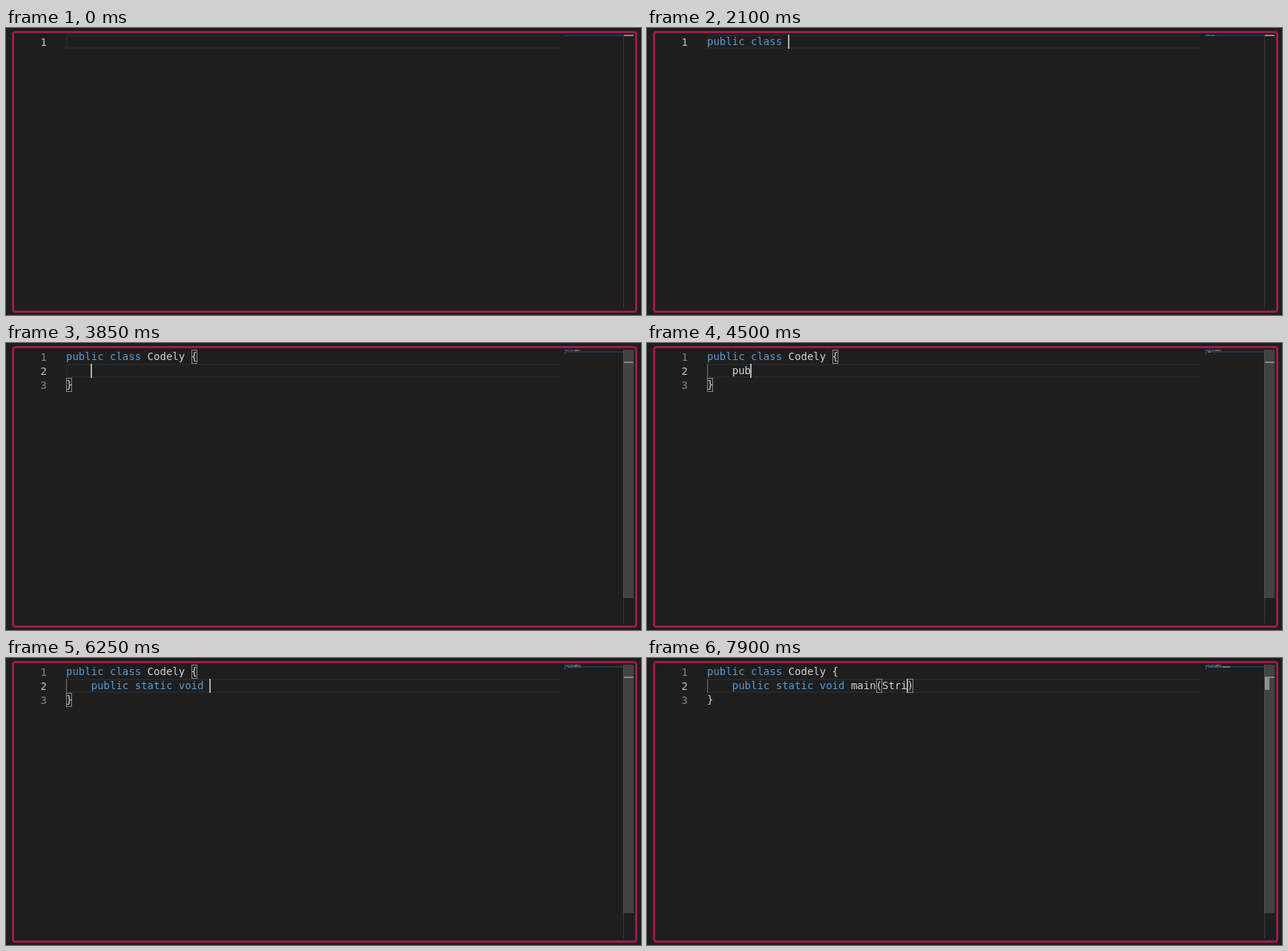
An HTML page for the animation above (8000 ms loop, 856x387 px).

```html
<!DOCTYPE html>
<html lang="en">
<head>
<meta charset="utf-8">
<title>Typing in a code editor</title>
<style>
  html, body { margin: 0; width: 100%; height: 100%; overflow: hidden; background: #1e1e1e; }
  svg { display: block; width: 100vw; height: 100vh; }
  text { font: 14px "DejaVu Sans Mono", monospace; white-space: pre; }
  rect { shape-rendering: crispEdges; }
  .frame { shape-rendering: auto; fill: none; stroke: #9c1b4d; stroke-width: 3; }
</style>
</head>
<body>
<svg id="stage" viewBox="0 0 856 387" xmlns="http://www.w3.org/2000/svg">
  <rect class="frame" x="9.5" y="5.5" width="840" height="377" rx="3"/>
  <g id="editor"></g>
</svg>
<script>
const LOOP = 8000;
const LEFT = 81, TOP = 9, ROW = 19, CHAR = 8.428;
const MAP_X = 753, MAP_ROW = 2, RULER_X = 832;
const KEYWORDS = /\b(public|class|static|void)\b/;
const BLUE = '#569cd6', WHITE = '#d4d4d4';

// One time in ms for every character of the line.
const HEAD = {
  text: 'public class Codely ',
  times: [900, 1050, 1150, 1200, 1300, 1400, 1500, 1600, 1700, 1750, 1850,
    2000, 2100, 2350, 2450, 2550, 2650, 2700, 2850, 3400]
};
const BODY = {
  text: 'public static void main(Stri',
  times: [4200, 4450, 4500, 4550, 4650, 4700, 4900, 4900, 5000, 5100, 5150,
    5300, 5400, 5600, 5850, 5950, 6050, 6100, 6250, 6350, 6450, 6600, 6650,
    7100, 7550, 7800, 7850, 7900]
};
const BRACE = 3600, BRACE_MATCH = 3650, ENTER = 3750, SLIDER = 3800, READY = 3850;
const PAREN = 7100, PAREN_MATCH = 7200;
const BLINK = [[0, 250], [750, 900], [3350, 3400]];

const editor = document.getElementById('editor');

const typed = (line, t) => line.text.slice(0, line.times.filter(at => at <= t).length);
const rect = (x, y, w, h, fill, more = '') =>
  `<rect x="${x}" y="${y}" width="${w}" height="${h}" fill="${fill}" ${more}/>`;
const label = (x, y, fill, content) => `<text x="${x}" y="${y}" fill="${fill}">${content}</text>`;
const tokens = line => line.split(KEYWORDS).map(s =>
  ({ s, color: KEYWORDS.test(s) ? BLUE : WHITE }));

function codeLine(line, row) {
  const spans = tokens(line).map(k => `<tspan fill="${k.color}">${k.s}</tspan>`);
  return label(LEFT, TOP + row * ROW + 14, WHITE, spans.join(''));
}

function mapLine(line, row) {
  let col = 0, out = '';
  for (const { s, color } of tokens(line)) {
    for (const c of s) {
      if (c !== ' ') out += rect(MAP_X + col, TOP + row * MAP_ROW, 1, MAP_ROW, color, 'opacity=".4"');
      col++;
    }
  }
  return out;
}

function bracketBox(col, row) {
  const x = Math.round(LEFT + col * CHAR);
  return rect(x + .5, TOP + row * ROW + .5, 7, ROW - 1, 'rgba(0,100,0,.1)', 'stroke="#888"');
}

function state(t) {
  const head = typed(HEAD, t), body = typed(BODY, t);
  if (t < ENTER) {
    return {
      lines: [head + (t >= BRACE ? '{}' : '')], row: 0,
      col: head.length + (t >= BRACE ? 1 : 0),
      match: t >= BRACE_MATCH ? [[20, 0], [21, 0]] : []
    };
  }
  const col = 4 + body.length;
  let match = t >= READY ? [[20, 0], [0, 2]] : [];
  if (t >= PAREN_MATCH) match = [[27, 1], [col, 1]];
  return {
    lines: [head + '{', '    ' + body + (t >= PAREN ? ')' : ''), '}'],
    row: 1, col, match
  };
}

function draw(t) {
  const { lines, row, col, match } = state(t);
  const y = TOP + row * ROW;
  let out = '';

  // Current line: an open box that runs under the minimap.
  out += rect(LEFT, y, 664, 2, '#282828') + rect(LEFT, y + ROW - 2, 664, 2, '#282828')
    + rect(LEFT, y, 2, ROW, '#282828');
  if (t >= BODY.times[0]) out += rect(LEFT, TOP + ROW, 1, ROW, '#707070');

  match.forEach(m => out += bracketBox(...m));
  lines.forEach((line, i) => {
    out += label(46.5, TOP + i * ROW + 15, i === row ? '#c6c6c6' : '#858585', i + 1);
    out += codeLine(line, i);
  });
  if (!BLINK.some(([from, to]) => t >= from && t < to)) {
    out += rect(Math.floor(LEFT + col * CHAR), y, 2, ROW, '#aeafad');
  }

  out += rect(MAP_X, TOP + row * MAP_ROW, RULER_X - MAP_X, MAP_ROW, '#264f78', 'opacity=".5"');
  lines.forEach((line, i) => out += mapLine(line, i));

  // Overview ruler with its marks and the scroll slider.
  out += rect(RULER_X, TOP, 1, 369, '#393939');
  out += rect(RULER_X + 1, row ? 25 : TOP, 13, 2, '#a0a0a0', 'opacity=".85"');
  if (t >= PAREN_MATCH) out += rect(RULER_X + 1, 26, 6, 17, '#a0a0a0');
  if (t >= SLIDER) {
    out += rect(RULER_X, TOP, 14, 335, '#797979', `opacity="${t < READY ? .2 : .4}"`);
  }
  editor.innerHTML = out;
}

const start = performance.now();
function tick() {
  draw((performance.now() - start) % LOOP);
  requestAnimationFrame(tick);
}
tick();
</script>
</body>
</html>
```
